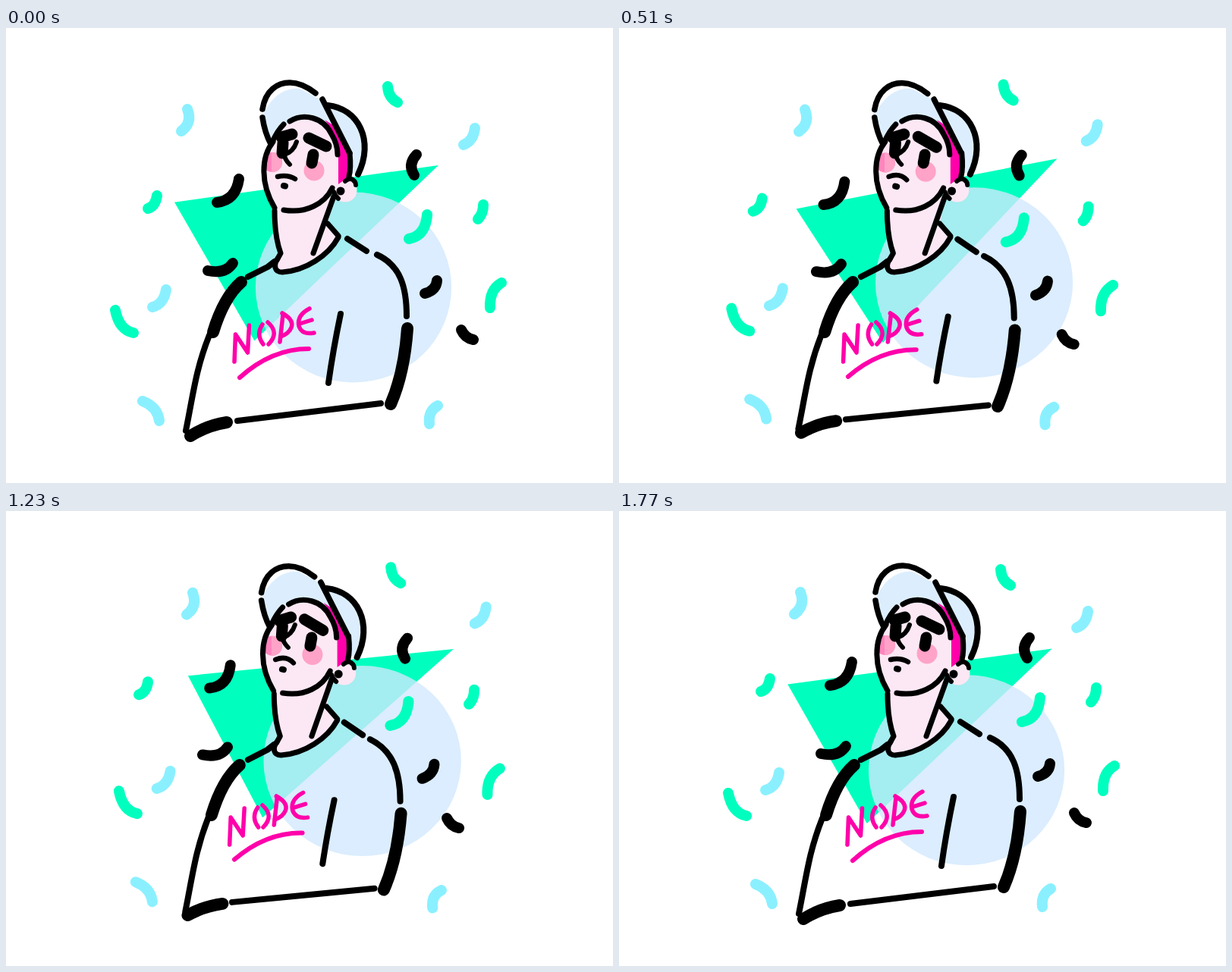
An HTML page that plays this animation: 800 px wide and 600 px high, repeating every 1800 ms.

```html
<!DOCTYPE html>
<html>
<head>
<meta charset="utf-8">
<style>
html, body { margin: 0; width: 100%; height: 100%; overflow: hidden; background: #fff; }
svg { display: block; width: 800px; height: 600px; }
path { stroke-linecap: round; stroke-linejoin: round; }
</style>
</head>
<body>
<svg id="stage" viewBox="0 0 800 600">
  <polygon id="tri" fill="#00ffbf"/>
  <ellipse id="disc" ry="125.5" fill="rgba(210,233,254,.784)"/>
</svg>
<script>
const LOOP = 1800;
const INK = '#000', GREEN = '#00ffbf', CYAN = '#8af0ff', PINK = '#ff00aa',
      SKIN = '#fce8f4', BLUSH = '#ffa3c8', CAP = '#dceefe';
const stage = document.getElementById('stage');
const tri = document.getElementById('tri');
const disc = document.getElementById('disc');
const shapes = [];

// A path and the shift of each of its points at full breath;
// the last shift repeats. Width 0 means a filled shape.
function add(color, width, d, shift = '-2 0') {
  const el = document.createElementNS('http://www.w3.org/2000/svg', 'path');
  el.setAttribute('fill', width ? 'none' : color);
  if (width) {
    el.setAttribute('stroke', color);
    el.setAttribute('stroke-width', width);
  }
  stage.append(el);
  shapes.push({ el, d, shift: shift.split(' ').map(Number) });
}
const ink = (width, d, shift) => add(INK, width, d, shift);
const dot = (color, size, x, y, shift) => add(color, size, `M${x} ${y}L${x} ${y}`, shift);

// Neck and ear
add(SKIN, 0, 'M354 232L432 222L424 258L438 275C425 300 395 320 364 322C354 322 353 311 362 298Q354 275 354 232Z', '-1 0 -3 0 -2 0 -2 0');
dot(SKIN, 31, 447, 214);

// Cap
add(CAP, 0, 'M340 112C351 89 369 78 387 80L416 95L453 165L438 150L425 125C408 114 390 114 374 123L350 152Q342 138 340 112Z');
add(CAP, 0, 'M424 102C464 106 486 148 464 193L454 190L453 165Z');

// Face and hair
add(SKIN, 0, 'M352 149L374 121C400 110 434 122 438 168L441 205L430 214C418 236 395 244 357 239C335 205 335 170 352 149Z');
add(PINK, 0, 'M420 121L434 130L453 165Q456 184 452 196L438 206L438 168Q437 142 420 121Z');
add('#ff85bd', 26, 'M351 177L351 177', '0 1');
add(BLUSH, 0, 'M350 164C359 164 364 170 364 177C364 185 358 190 350 190Z', '0 1');
dot(BLUSH, 27, 406, 188, '-3 2');

ink(7.5, 'M338 107C342 82 358 72 374 72C388 72 399 79 408 86', '-2 1');
ink(7.5, 'M338 118Q341 138 349 153');
ink(7, 'M351 150Q358 135 366 127');
ink(7, 'M374 123C392 112 418 117 429 140Q437 153 437 167');
ink(7.5, 'M417 94L453 165', '-3 0');
ink(8, 'M424 102C464 106 486 148 464 193');
ink(7, 'M453 165Q455 185 452 196');
ink(7, 'M352 150C336 170 335 205 354 237', '-2 0');
ink(7, 'M366 240C395 245 420 232 430 211', '-2 0 -2 0 -4 0');
ink(6, 'M447 202Q453 197 457 200Q461 203 461 207', '-3 0');
ink(6, 'M432 216Q434 222 438 225', '-4 0');
dot(INK, 11, 441, 215, '-4 0');

// Features
ink(15, 'M363 144L377 140', '-4 1 -2 0');
ink(15, 'M365 152L364 165', '-1 0');
ink(6, 'M383 150Q379 163 367 167Q367 173 374 180', '-3 0');
ink(15, 'M399 145L422 156', '-8 -3 -6 2');
ink(15, 'M405 167L403 178', '-3 0');
ink(6.5, 'M358 196Q371 193 381 199', '-4 0 -2 -4 -3 2');
ink(8, 'M366 208L368 208.5', '-3 1');

// Neck and collar lines
ink(7, 'M354 241Q354 275 362 297L357 306', '-1 0');
ink(7, 'M358 304C352 313 354 322 364 322C395 320 425 300 438 276', '-1 0 -2 0');
ink(7, 'M432 222L405 297', '-4 0 -3 0');
ink(7, 'M424 258L438 274', '-2 0');

// Shirt
ink(8, 'M319 328L345 315L354 308', '0 0 -1 0');
ink(16, 'M310 335Q287 355 273 401', '-3 0');
ink(8, 'M268 405C250 450 247 482 237 531', '-2 -1 -1 -2 -1 -4');
ink(16, 'M243 538Q265 524 291 520', '-5 -7 -6 -4 -8 -3');
ink(8, 'M305 518L494 495', '-10 -3 -12 4');
ink(16, 'M529 396Q525 455 507 496', '-12 4 -13 5');
ink(8, 'M489 299C520 313 528 342 528 380', '-13 3 -14 4 -12 4');
ink(8, 'M450 278L475 294', '-6 1 -7 2');
ink(8, 'M441 377Q431 425 425 468', '-12 6 -11 0 -11 -4');

// Lettering
add(PINK, 5.5, 'M301 440L302.5 404L318.5 428L320.5 392', '-9 0');
add(PINK, 5.5, 'M338 391Q329 404 339 417', '-9 0');
add(PINK, 5.5, 'M345 388Q361 402 346 417', '-10 0');
add(PINK, 5.5, 'M365 378L361 414', '-11 0');
add(PINK, 5.5, 'M364 376Q380 385 376 395Q373 403 362 407', '-11 0');
add(PINK, 5.5, 'M400 370Q383 379 386 393Q390 405 406 402', '-12 2 -12 2 -12 2 -12 2 -12 3');
add(PINK, 5.5, 'M387 390L403 385', '-12 2');
add(PINK, 6, 'M308 461Q350 423 399 423', '-10 -2 -11 1 -12 2');

// Confetti
[
  [GREEN, 'M503 77Q504 92 516 98', '6 -4'],
  [CYAN, 'M239 107Q246 125 231 136', '10 1'],
  [CYAN, 'M618 132Q616 149 603 154', '21 -8'],
  [INK, 'M541 167Q529 180 538 194', '-17 1'],
  [INK, 'M307 199Q303 227 278 230', '-16 6 -15 6 -14 5'],
  [GREEN, 'M199 221Q197 235 187 238', '-17 6'],
  [INK, 'M299 310Q289 325 266 320', '-10 2'],
  [CYAN, 'M211 345Q208 364 193 368', '8 -3'],
  [GREEN, 'M144 372Q149 398 168 402', '7 -4'],
  [CYAN, 'M180 492Q200 500 202 518', '-13 -4'],
  [GREEN, 'M629 233Q629 245 622 252', '-17 4'],
  [GREEN, 'M555 246Q553 274 531 278', '-35 7'],
  [INK, 'M568 333Q567 346 552 350', '-5 1 -5 2 -5 4'],
  [GREEN, 'M653 336Q637 345 638 369', '-3 5 -5 7'],
  [INK, 'M600 398Q605 409 616 411', '-27 10'],
  [CYAN, 'M569 498Q556 505 558 522', '7 3 6 2'],
].forEach(([color, d, shift]) => add(color, 14, d, shift));

function draw(now) {
  const a = now % LOOP / LOOP * 2 * Math.PI, c = Math.cos(a), s = Math.sin(a);
  const breath = (1 - c) / 2;

  for (const { el, d, shift } of shapes) {
    let i = 0;
    el.setAttribute('d', d.replace(/[\d.]+/g, n => {
      const k = Math.min(i, shift.length - 2 + i % 2);
      i++;
      return (+n + shift[k] * breath).toFixed(2);
    }));
  }

  // The triangle keeps its shape while two corners circle around
  const x = 233.3 - 11.3 * c - 2.2 * s, y = 228 + 1.6 * c + 11 * s;
  const x2 = 580.6 - 10.6 * c - 5.5 * s, y2 = 178.2 + 2.8 * c - 5.5 * s;
  const dx = x2 - x, dy = y2 - y;
  tri.setAttribute('points',
    [x, y, x2, y2, x + .225 * dx - .557 * dy, y + .225 * dy + .557 * dx]);

  disc.setAttribute('cx', 466.3 - 8.3 * c);
  disc.setAttribute('cy', 334.8 + 7.2 * c + 2.5 * s);
  disc.setAttribute('rx', 129.9 - .8 * c);
}

const start = performance.now();
(function tick() {
  draw(performance.now() - start);
  requestAnimationFrame(tick);
})();
</script>
</body>
</html>
```
